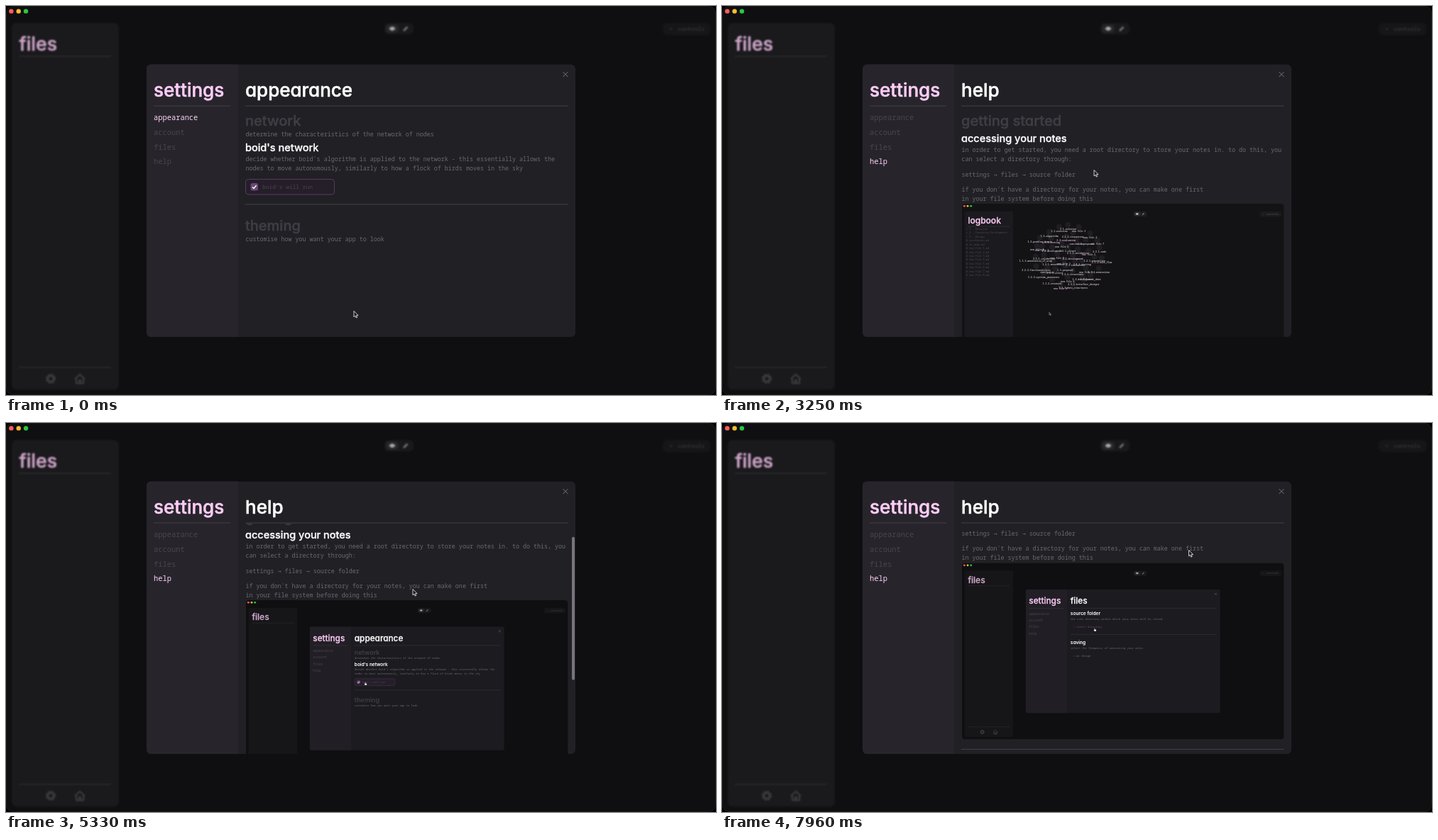
These frames come from a looping animation (1000 by 549 pixels, 8 s). An HTML page:

```html
<!DOCTYPE html>
<html lang="en">
<head>
<meta charset="utf-8">
<title>settings</title>
<style>
  html, body { margin: 0; width: 100%; height: 100%; overflow: hidden; background: #000; }
  svg { display: block; width: 1000px; height: 549px; }
  text { white-space: pre; }
  .head { font-family: Inter, sans-serif; font-weight: 500; font-feature-settings: "cv11"; stroke-width: .022em; stroke-linejoin: round; }
  .mono { font-family: "Noto Sans Mono", "DejaVu Sans Mono", monospace; }
  .menu { font-weight: 500; }
  .arrow { font-family: "DejaVu Sans Mono", monospace; }
  .blur { filter: blur(1.2px); }
  .label { text-anchor: middle; font-weight: 600; }
</style>
</head>
<body>
<svg id="stage" viewBox="0 0 1000 549"></svg>
<script>
const LOOP = 8000, SCALE = 0.4535;
const PINK = '#ffcdf9', WHITE = '#fff', FAINT = '#3f3e44', DIM = '#48464c', GREY = '#6b696f', LINE = '#424046';
const APP = { panel: '#201f23', side: '#27252b', body: '#212025', active: '#ffd3fa' };
const VIDEO = { panel: '#1b1a1e', side: '#211f25', body: '#1c1b20', active: DIM };
const $ = id => document.getElementById(id);

// ---- drawing helpers ----
const text = (x, y, size, fill, s, cls = 'mono') =>
  `<text x="${x}" y="${y}" font-size="${size}" fill="${fill}" class="${cls}">${s}</text>`;
const head = (x, y, size, fill, s) =>
  `<text x="${x}" y="${y}" font-size="${size}" fill="${fill}" stroke="${fill}" class="head">${s}</text>`;
const note = (y, s, fill = GREY, x = 337.5) => text(x, y, 8.36, fill, s);
const rule = (x1, x2, y) => `<path d="M${x1} ${y}H${x2}" stroke="${LINE}"/>`;
const box = (x, y, w, h, r, fill, more = '') =>
  `<rect x="${x}" y="${y}" width="${w}" height="${h}" rx="${r}" fill="${fill}" ${more}/>`;
const dot = (x, y, r, fill) => `<circle cx="${x}" cy="${y}" r="${r}" fill="${fill}"/>`;
const group = (id, s, more = '') => `<g id="${id}" ${more}>${s}</g>`;
const ARROW = '<tspan class="arrow">→</tspan>';

const cursor = id => group(id, `
  <path d="M0 0V8.4L1.9 6.7L3.2 9.6L4.6 9L3.4 6.2H6Z" fill="#111" stroke="#fff" stroke-width=".8"/>
  <path d="M-1 .8Q0-.6 1 .8V3.6L4 4.4Q5.4 4.9 5 6.4L4.2 9.6H-.4L-3 6.2Q-3 4.8-1.6 5.4L-1 6Z" fill="#fff" stroke="#222" stroke-width=".6"/>`);

const lights = ['#ff5f57', '#febc2e', '#28c840'].map((c, i) => dot(7.4 + i * 10.3, 7.4, 3.2, c)).join('');

const gear = `<g fill="none" stroke="#4c4a50"><circle cx="63" cy="526" r="4.2" stroke-width="3"/>
  <circle cx="63" cy="526" r="6.3" stroke-width="2" stroke-dasharray="2.6 2.35"/></g>`;
const house = `<path d="M97 526.5L104 520L111 526.5M99 526V532.5H109V526" fill="none" stroke="#4c4a50" stroke-width="2.2"/>
  ${box(102.2, 527, 3.6, 5, 0, '#4c4a50')}`;
const toggle = box(533, 24, 41, 16, 6, '#1f1e22') + box(535, 26, 18, 12, 5, '#302f33') +
  `<path d="M539.5 32Q544 26 548.5 32Q544 38 539.5 32Z" fill="#d0ced2"/>
   <path d="M560 35L565.5 29.5" stroke="#88868c" stroke-width="3"/>`;
const controls = box(925, 24, 67, 17, 6, '#1b1a1e') + text(934, 35, 7.9, '#545257', '+') + text(946, 35, 7.9, '#545257', 'controls');

const shell = (look, title, extra = '') => box(0, 0, 1000, 549, 0, '#131315') + extra +
  box(8, 24, 151, 517.5, 7, look.panel) + head(18.5, 62.5, 26.6, PINK, title) + rule(18, 148, 71) +
  rule(18, 148, 510) + gear + house + toggle + controls;

const shade = box(0, 0, 1000, 549, 0, '#000', 'opacity=".2"');

const MENU = ['appearance', 'account', 'files', 'help'];
const modal = (look, id, page, body) => group(id, box(198, 82.5, 604, 384.5, 6, look.body) +
  `<path d="M327 82.5H204a6 6 0 0 0-6 6V461a6 6 0 0 0 6 6H327z" fill="${look.side}"/>` +
  head(208, 127.5, 26, PINK, 'settings') + rule(208, 316, 141) +
  MENU.map((m, i) => text(208, 161 + i * 20.8, 10.4, m === page ? look.active : DIM, m, 'mono menu')).join('') +
  head(337, 127.5, 26, WHITE, page) + body + rule(337, 791.5, 141) +
  '<path d="M784.5 93l7 7m0-7l-7 7" stroke="#77757b"/>');

// ---- pages ----
const appearance = head(337, 169, 20, FAINT, 'network') +
  note(184, 'determine the characteristics of the network of nodes') +
  head(337, 204.5, 14.5, WHITE, "boid's network") +
  note(219, "decide whether boid's algorithm is applied to the network - this essentially allows the") +
  note(232, 'nodes to move autonomously, similarly to how a flock of birds moves in the sky') +
  box(337.5, 244.5, 125, 21.5, 4, '#241f29', 'stroke="#583a61"') +
  box(344.5, 250, 10.5, 10.5, 2.5, '#6d4777') +
  '<path d="M347 255.5l2 2l3.6-4.4" fill="none" stroke="#fff" stroke-width="1.5"/>' +
  text(361, 258, 7.9, '#563d5e', "boid's will run") + rule(337, 791.5, 280) +
  head(337, 316.5, 20, FAINT, 'theming') + note(331.5, 'customise how you want your app to look');

const files = (folder, fill) => head(337, 161.5, 14.7, WHITE, 'source folder') +
  note(177, 'the root directory within which your notes will be stored') +
  note(201.5, `${ARROW} ${folder}`, fill, 345) + rule(337, 791.5, 222.5) +
  head(337, 252.5, 14.7, WHITE, 'saving') +
  note(268, 'select the frequency of autosaving your notes') + note(292, `${ARROW} on change`, GREY, 345);

// ---- flock of file nodes ----
const RIM = ['new file 3', 'new file 2', 'new file 7', '2.2.1-code', '2.1.2-user_flow', '2.1.4-annotation', '2.3.2-test_data',
  '2.1.5-interface_designs', '2.1.3-data_structures', 'new file 8', '1.1.2-research', '1.2.2-systems_processes',
  '2.2.2-functionalities', '1.1.3-annotation_of_ucap', 'new file 4', '1.2-problem_domain', '1.2-algorithm', '1.1-overview', '2.1-solution'];
const CORE = ['2.2-development', 'new file 5', '1.1.1-client', '2.3-evaluation', 'new file 1', '2.1.1-validation', '1.3-proposal',
  'new file 6', '2.3.1-testing', '1.2.1-annotation', 'conclusion', '2.2.3-iterations'];
const nodes = RIM.map((s, i) => ({ s, a: (-69 + i * 360 / RIM.length) * Math.PI / 180, r: 1 }));
for (let i = 0; i < 26; i++)
  nodes.push({ s: CORE[i % CORE.length], a: i * 2.39996, r: 0.85 * Math.sqrt((i + 0.5) / 26) });

const flock = '<g id="flock">' +
  nodes.map(() => dot(0, -13, 9, '#1f1e22')).join('') +
  nodes.map((n, i) => text(0, 2.5, 7.1, i % 5 === 4 ? '#c9a3c6' : '#b8b0b8', n.s, 'mono label')).join('') + '</g>';

const LIST = ['&gt; 1 - Research', '&gt; 2 - Iterative Development', '&gt; 3 - Design', '# conclusion.md', '# to work.md'];
for (let i = 1; i < 9; i++) LIST.push(`# new file ${i}.md`);
const list = LIST.map((s, i) => text(13, 81.5 + i * 12, 7.9, '#4e4c52', s)).join('');

// ---- the small recording inside the help page ----
const thumb = group('thumb', box(892, 487, 101, 55, 3, '#121115', 'stroke="#3a393e"') + box(894, 490, 15, 50, 2, '#1d1c20') +
  box(912, 495, 64, 39, 2, '#1b1a1e'));
const recording = group('lib', shell(VIDEO, 'logbook', flock) + list) +
  group('empty', shell(VIDEO, 'files'), 'class="blur"') + group('shade', shade) +
  modal(VIDEO, 'mSet', 'files', files('/Users/user/Documents/coursework/demo_directory', '#6d4777')) +
  modal(VIDEO, 'mLook', 'appearance', appearance) +
  modal(VIDEO, 'mFiles', 'files', files('select directory', '#6d4777')) + thumb + lights + cursor('cur2');

const help = `<g clip-path="url(#view)"><g id="scroll">` +
  head(337, 169, 20, FAINT, 'getting started') + head(337, 192, 14.5, WHITE, 'accessing your notes') +
  note(206, 'in order to get started, you need a root directory to store your notes in. to do this, you') +
  note(219, 'can select a directory through:') +
  note(240.5, `settings ${ARROW} files ${ARROW} source folder`) +
  note(261.5, "if you don't have a directory for your notes, you can make one first") +
  note(274.5, 'in your file system before doing this') +
  `<g transform="translate(338 279) scale(${SCALE})" clip-path="url(#win)">${recording}</g>` +
  rule(337, 791.5, 542) + '</g></g>' + box(797, 0, 4, 202, 2, '#77757b', 'id="bar"');

$('stage').innerHTML = `<defs>
  <clipPath id="win"><rect width="1000" height="549" rx="10"/></clipPath>
  <clipPath id="view"><rect x="330" y="142" width="472" height="325"/></clipPath></defs>
  <g clip-path="url(#win)"><g class="blur">${shell(APP, 'files')}</g>${shade}${lights}
  <rect x=".5" y=".5" width="999" height="548" rx="9.5" fill="none" stroke="#fff" opacity=".06"/>
  ${modal(APP, 'pLook', 'appearance', appearance)}${modal(APP, 'pHelp', 'help', help)}</g>${cursor('cur')}`;

// ---- motion ----
// keys: time, value, time, value ... eased between neighbours
function track(t, keys) {
  if (t <= keys[0]) return keys[1];
  for (let i = 2; i < keys.length; i += 2) {
    if (t < keys[i]) {
      const u = (t - keys[i - 2]) / (keys[i] - keys[i - 2]);
      return keys[i - 1] + (keys[i + 1] - keys[i - 1]) * u * u * (3 - 2 * u);
    }
  }
  return keys[keys.length - 1];
}
const show = (id, on) => { $(id).style.display = on ? '' : 'none'; };
const move = (el, x, y) => el.setAttribute('transform', `translate(${x.toFixed(2)} ${y.toFixed(2)})`);
const over = (x, y, x1, y1, x2, y2) => x > x1 && x < x2 && y > y1 && y < y2;
const overMenu = (x, y) => over(x, y, 205, 150, 290, 226);

function place(id, x, y, hand) {
  const [arrow, finger] = $(id).children;
  move($(id), x, y);
  arrow.style.display = hand ? 'none' : '';
  finger.style.display = hand ? '' : 'none';
}

const X = [100, 490, 850, 236, 1830, 236, 3700, 573, 6750, 573, 7700, 657.5];
const Y = [100, 430.5, 850, 213, 1830, 213, 2580, 226, 3700, 234.5, 6750, 234.5, 7700, 179.5];
const X2 = [1700, 161, 2400, 271, 4449, 271, 4450, 350, 5100, 350, 5600, 396, 6000, 396, 6850, 225, 7050, 225, 7800, 412];
const Y2 = [1700, 312, 2400, 338, 4449, 338, 4450, 251, 5100, 251, 5600, 260, 6000, 260, 6850, 198, 7050, 198, 7800, 203];
const SCROLL = [4600, 0, 4880, 20, 5150, 20, 5700, 55.5, 5850, 55.5, 6250, 81.5];

function drift(t) {
  const u = (t - 2580) / 1340, kids = $('flock').children;
  nodes.forEach((n, i) => {
    const x = 338 - 16 * u + (107 - 8 * u) * n.r * Math.cos(n.a) + 4 * Math.sin(t / 700 + i * 2.1);
    const y = 184 - 24 * u + (98 - 15 * u) * n.r * Math.sin(n.a) + 3 * Math.cos(t / 800 + i * 1.7);
    move(kids[i], x, y);
    move(kids[nodes.length + i], x, y);
  });
}

function frame() {
  const t = performance.now() % LOOP;
  const x = track(t, X), y = track(t, Y), s = track(t, SCROLL);
  place('cur', x, y, overMenu(x, y));
  show('pLook', t < 1000);
  show('pHelp', t >= 1000);

  move($('scroll'), 0, -s);
  move($('bar'), 0, 142.7 + 0.62 * s);
  $('bar').style.opacity = track(t, [4600, 0, 4700, 1, 6450, 1, 6650, 0]);

  const closed = t >= 1800 && t < 4450, lib = t < 4450;
  show('lib', lib);
  $('lib').classList.toggle('blur', !closed);
  show('empty', !lib);
  show('shade', !closed);
  show('mSet', t < 1800);
  show('mLook', !lib && t < 7000);
  show('mFiles', t >= 7000);
  show('thumb', !lib && t < 6950);
  move($('thumb'), track(t, [6750, 0, 6950, 110]), 0);
  if (lib) drift(t);

  const x2 = track(t, X2), y2 = track(t, Y2);
  const onButton = t < 7000 ? over(x2, y2, 337, 244, 463, 266) : over(x2, y2, 340, 192, 440, 208);
  place('cur2', x2, y2, !lib && (overMenu(x2, y2) || onButton));
  requestAnimationFrame(frame);
}
frame();
</script>
</body>
</html>
```
